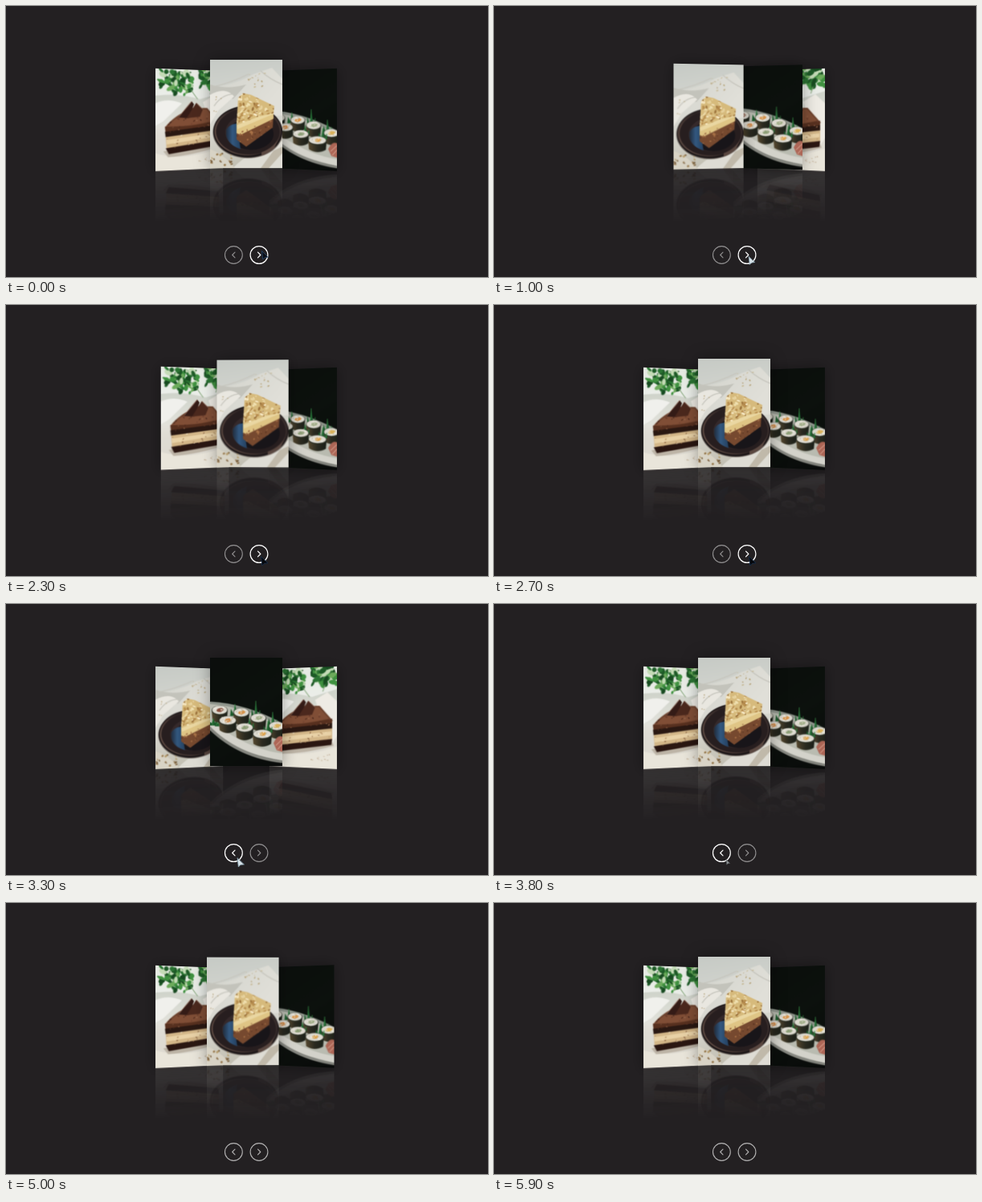
An HTML page with a canvas that plays this animation: 600 by 338 pixels, repeating every 6000 ms.

```html
<!DOCTYPE html>
<html lang="en">
<head>
<meta charset="utf-8">
<title>Dessert carousel</title>
<style>
  html, body { margin: 0; width: 100%; height: 100%; overflow: hidden; background: #232022; }
  #stage { position: absolute; left: 0; top: 0; width: 600px; height: 338px; overflow: hidden; background: #232022; }
  #deck { position: absolute; inset: 0; perspective: 375px; perspective-origin: 299.2px 135px; }
  #ring { position: absolute; inset: 0; transform-style: preserve-3d; }
  .card { position: absolute; left: 254px; top: 66.7px; width: 90.4px; height: 135.6px; box-shadow: 0 0 18px rgba(0, 0, 0, .36); }
  .card canvas { position: absolute; left: 0; top: 0; width: 90.4px; height: 203.4px; }
  svg { position: absolute; left: 0; top: 0; }
</style>
</head>
<body>
<div id="stage">
  <div id="deck"><div id="ring"></div></div>
  <svg width="600" height="338" fill="none" stroke="#fff" stroke-linecap="round" stroke-linejoin="round">
    <g id="prev"><circle cx="283.4" cy="310.5" r="10.9"/><path d="M285 307.2l-3.3 3.3 3.3 3.3"/></g>
    <g id="next"><circle cx="315" cy="310.5" r="10.9"/><path d="M313.5 307.2l3.3 3.3-3.3 3.3"/></g>
    <path id="cursor" d="M0 0L1.2 10 3.6 7.6 7.4 7.2Z" stroke-width=".7"/>
  </svg>
</div>
<script>
const W = 90, H = 136, SCALE = 2, LOOP = 6000, STEP = 100, SPEED = 300;
const $ = id => document.getElementById(id);

function random(seed) {
  return () => (seed = (seed * 16807) % 2147483647) / 2147483647;
}

function painter(c) {
  const fill = color => { c.fillStyle = color; c.fill(); };
  const p = {
    poly(color, ...v) {
      c.beginPath();
      for (let i = 0; i < v.length; i += 2) c.lineTo(v[i], v[i + 1]);
      fill(color);
    },
    path(color, d) { c.fillStyle = color; c.fill(new Path2D(d)); },
    line(color, width, d) {
      c.strokeStyle = color; c.lineWidth = width; c.stroke(new Path2D(d));
    },
    oval(color, x, y, rx, ry, turn = 0) {
      c.beginPath(); c.ellipse(x, y, rx, ry, turn, 0, 7); fill(color);
    },
    fade(x0, y0, x1, y1, ...colors) {
      const g = c.createLinearGradient(x0, y0, x1, y1);
      colors.forEach((s, i) => g.addColorStop(i / (colors.length - 1), s));
      return g;
    },
    // Scatter small spots, optionally clipped to a shape
    spots(seed, count, [x, y, w, h], size, colors, clip) {
      const r = random(seed);
      c.save();
      if (clip) c.clip(new Path2D(clip));
      for (let i = 0; i < count; i++)
        p.oval(colors[i % colors.length], x + r() * w, y + r() * h,
          size * (.5 + r()), size * (.35 + r() * .6), r() * 3);
      c.restore();
    }
  };
  return p;
}

function cake(p) {
  p.poly(p.fade(0, 0, 0, H, '#e6ebe3', '#eceeea', '#dfdcd4', '#dcd8ce'), 0, 0, W, 0, W, H, 0, H);
  p.path(p.fade(0, 34, 0, 76, '#cfd3ca', '#e2e2db'), 'M0 36Q30 32 58 40L90 30V60L0 78Z');
  p.path('#f0f0ec', 'M0 46Q16 38 34 46L10 70 0 76Z');
  const leaves = ['#1d5a26', '#3f9140', '#2b7433', '#6dab5c', '#c4dbb6', '#174a20'];
  p.spots(7, 62, [7, 2, 40, 24], 4, leaves);
  p.spots(21, 16, [24, 18, 22, 16], 3, leaves);
  p.spots(33, 55, [58, -2, 33, 26], 4, leaves);
  p.line('#7fa274', 1, 'M46 27Q51 35 55 40M75 24L72 33');
  p.path('#eeebe4', 'M62 44L78 34 90 46V92L83 104Z');
  p.path('#e9e5da', 'M0 112Q36 126 90 106V136H0Z');
  p.path('#bdb4a6', 'M10 110L16 118Q48 117 86 105L83 98Z');

  p.path('#6b402b', 'M12 78Q24 62 48 52L68 52 85 72 13 88Z');
  p.path('#804e36', 'M15 77Q28 62 50 54L67 54 80 69 22 81Z');
  p.path('#57301f', 'M12 77Q48 78 84 69V78L13 86Z');
  p.path('#2a1812', 'M12 84L84 75V84L13 92Z');
  p.path('#d3b688', 'M13 91L84 82V98L14 107Z');
  p.path('#e8d1a6', 'M14 95L83 86V91L14 101Z');
  p.path('#2a1611', 'M13 106L84 96 83 104 17 114Z');
  p.spots(43, 65, [12, 52, 72, 34], 1.1, ['#95654a', '#64392a', '#4a281c'], 'M12 78Q24 62 48 52L68 52 85 72 84 78 13 86Z');
  p.spots(47, 36, [13, 84, 70, 24], .9, ['#a87f54', '#f2e2c0', '#7d5436'], 'M13 91L84 82V98L14 107Z');
  p.path('#341b16', 'M29 65L47 43 50 47 43 66Z');
  p.path('#4b281d', 'M40 66L53 45 62 54 58 64Z');
  p.line('#8b6454', .8, 'M30 64L47 43M53 45L62 54');
  p.spots(52, 12, [57, 117, 25, 9], .8, ['#a98a6c', '#c2ab8c']);
}

function pie(p) {
  p.poly(p.fade(0, 0, 20, H, '#c6cac5', '#d2d4ce', '#d6d5cd', '#c2bfb2'), 0, 0, W, 0, W, H, 0, H);
  p.path(p.fade(0, 20, 60, 70, '#d3d4cd', '#e0dfd8'), 'M0 35Q30 32 54 18L77 10 90 24V70L0 76Z');
  p.path('#c3c3bb', 'M0 31Q22 38 45 31L29 49 0 45Z');
  p.path('#e9e7e0', 'M0 44Q19 33 30 46L10 64 0 81Z');
  p.line('#c6c5bd', 1.2, 'M4 34Q26 29 48 18M63 14Q75 25 90 31M5 58Q15 43 30 43');
  p.path('#dedcd4', 'M28 136Q54 110 90 102V136Z');
  p.path('#c0b9aa', 'M63 136L79 114 90 109V117L73 136Z');
  p.path('#d8d3c5', 'M0 112Q17 118 31 136H0Z');

  p.oval('#787069', 47, 91, 43.5, 32.5);
  p.oval('#1d1718', 47, 90, 43, 32.5);
  p.oval(p.fade(10, 115, 80, 65, '#6a544a', '#2d2323', '#3c302e'), 47, 89.5, 41.5, 30.5);
  p.oval('#271e1f', 47, 90, 39.5, 28.5);
  p.oval('#35292a', 48, 91, 29, 22);
  p.oval('#181519', 51, 93, 28, 20);
  p.path(p.fade(18, 0, 38, 0, '#1c222e', '#33587f', '#24405f'), 'M20 88Q24 81 33 80L38 112Q23 107 20 95Z');
  p.path('#5a4740', 'M64 116Q80 110 86 97L80 111Q70 119 64 120Z');

  const top = 'M35 48L41 42 51 44 80 58 79 67 61 71 33 82 34 64Z';
  const crust = 'M33 92L79 74 78 85 45 109 33 100Z';
  p.path('#76492f', 'M33 90L79 70 78 85 45 109 33 100Z');
  p.path('#dfc585', 'M33 76L79 60V74L38 94 33 92Z');
  p.path('#ead7a2', 'M33 79L79 63V68L34 87Z');
  p.path('#d6ba7c', top);
  p.spots(61, 130, [32, 40, 49, 41], 1.8, ['#f0e0b0', '#b98f50', '#e6d09c', '#f9ecca', '#9a7039'], top);
  p.spots(67, 65, [33, 72, 46, 37], 1.3, ['#8b5a3c', '#ab7448', '#5a3422', '#9c6742'], crust);
  p.spots(73, 18, [1, 117, 26, 15], 1.4, ['#987a50', '#b59b6c', '#7a6040']);
  p.spots(87, 13, [48, 17, 24, 18], 1, ['#b5a278', '#c4b48c']);
  p.spots(89, 5, [5, 43, 18, 30], .9, ['#b5a27a']);
}

function sushi(p) {
  p.poly(p.fade(0, 0, W, H, '#0b0e0c', '#0c110d', '#090b0a'), 0, 0, W, 0, W, H, 0, H);
  p.path('#8f958c', 'M0 55Q44 57 90 82V127Q40 122 0 83Z');
  p.path('#b9bbb0', 'M0 58Q43 61 90 87V121Q39 117 0 79Z');
  p.path('#d3d2ca', 'M0 79Q28 100 55 111 73 118 90 120V129Q47 122 22 105 8 96 0 86Z');
  p.path('#85867f', 'M0 86Q34 121 90 129V132Q36 126 0 91Z');
  const blade = (x, y, h) => {
    p.poly('#1b5a2b', x - 6, y, x - 5, y - h * .6, x - 2, y - 3, x, y - h, x + 3, y - 2, x + 5, y - h * .5, x + 6, y);
    p.line('#3a9149', .7, `M${x - 1} ${y}L${x} ${y - h}M${x + 4} ${y}L${x + 5} ${y - h * .5}`);
  };
  blade(31, 73, 15); blade(57, 78, 24); blade(78, 87, 19); blade(12, 86, 15);
  const roll = (x, y, heart, r = 10) => {
    const side = p.fade(x - r, 0, x + r, 0, '#57492f', '#2b2a20', '#1a1f18');
    p.path(side, `M${x - r} ${y}L${x - r + 1} ${y + 12}Q${x} ${y + 19} ${x + r - 1} ${y + 12}L${x + r} ${y}Z`);
    p.oval('#2c3026', x, y, r, 6);
    p.oval('#dddad0', x, y - .5, r - .8, 5.2);
    p.oval(heart, x + .5, y - .5, 4.5, 2.4, -.2);
    p.spots(x * 13 + y, 18, [x - 7, y - 4, 14, 7], .8, ['#f3f0e6', '#bfbba8']);
  };
  roll(12, 66, '#8a4e3c'); roll(39, 69, '#d6934a'); roll(60, 76, '#9aaa80'); roll(83, 86, '#d9b058');
  blade(49, 88, 12); blade(72, 94, 15);
  roll(22, 79, '#d4863f', 11); roll(43, 88, '#8a9d74', 11); roll(65, 96, '#dfa24a', 12);
  p.path('#ad6656', 'M79 107Q84 96 90 99V118L83 116Z');
  p.line('#d09a88', 1, 'M82 110L90 102M84 115L90 108');
  blade(4, 85, 9);
}

function makeCard(draw) {
  const art = document.createElement('canvas');
  art.width = W * SCALE;
  art.height = H * SCALE;
  const a = art.getContext('2d');
  a.scale(SCALE, SCALE);
  draw(painter(a));
  // Soften like a photo; the sharp copy beneath keeps the borders opaque
  a.filter = 'blur(1.1px)';
  a.drawImage(art, 0, 0, W, H);

  // Art on top, faded mirror image below
  const face = document.createElement('canvas');
  face.width = art.width;
  face.height = art.height * 1.5;
  const c = face.getContext('2d');
  c.scale(SCALE, SCALE);
  c.save();
  c.translate(0, 2 * H);
  c.scale(1, -1);
  c.drawImage(art, 0, 0, W, H);
  c.restore();
  c.globalCompositeOperation = 'destination-in';
  const mask = c.createLinearGradient(0, H, 0, H * 1.5);
  mask.addColorStop(0, 'rgba(0,0,0,.1)');
  mask.addColorStop(1, 'rgba(0,0,0,0)');
  c.fillStyle = mask;
  c.fillRect(0, 0, W, H * 1.5);
  c.globalCompositeOperation = 'source-over';
  c.clearRect(0, 0, W, H);
  c.drawImage(art, 0, 0, W, H);

  const card = document.createElement('div');
  card.className = 'card';
  card.append(face);
  $('ring').append(card);
  return card;
}

const cards = [cake, pie, sushi].map(makeCard);

// [click time, direction]
const clicks = [
  [922, 1], [1522, 1], [2116, 1], [2720, 1],
  [3490, -1], [3941, -1], [4365, -1], [4787, -1]
];

// [time, x, y, colour, outline, size]
const pointer = [
  [0, 318.5, 306, '#0a0d14', '#28507a', 1],
  [800, 316.5, 311, '#d8e3e9', '#819cab', 1],
  [1200, 317.5, 314, '#05070b', '#16304e', 1.1],
  [2800, 317.5, 314, '#05070b', '#16304e', 1.1],
  [3100, 287.5, 316, '#d8e3e9', '#819cab', 1.1],
  [3700, 289, 319, '#8d9295', '#45484b', .65],
  [4800, 288, 317, '#8d9295', '#45484b', .65],
  [4900, 153, 300, '#d8e3e9', '#819cab', 1]
];

// cubic-bezier(.25, .1, .25, 1)
function ease(x) {
  if (x >= 1) return 1;
  let lo = 0, hi = 1, u;
  for (let i = 0; i < 24; i++) {
    u = (lo + hi) / 2;
    if (.75 * u * (1 - u) + u ** 3 < x) lo = u; else hi = u;
  }
  return .3 * u * (1 - u) ** 2 + 3 * u * u * (1 - u) + u ** 3;
}

function placeCards(t) {
  let turn = 0, shift = 0;
  for (const [at, dir] of clicks) {
    if (t < at) break;
    turn += dir;
    shift = dir * (1 - ease((t - at) / SPEED));
  }
  cards.forEach((card, i) => {
    const rest = (i - turn + 12) % 3 - 1;
    const slot = Math.max(-1, Math.min(1, rest + shift));
    const far = Math.abs(slot);
    card.style.transform =
      `translate3d(${75.6 * slot}px, ${7.7 * far}px, ${-32 * far}px) rotateY(${-15 * slot}deg)`;
  });
}

function placePointer(t) {
  const i = pointer.findLastIndex(k => k[0] <= t);
  const [at, x, y, color, edge, size] = pointer[i];
  const [end, x1, y1] = pointer[i + 1] || [LOOP, x, y];
  const f = (t - at) / (end - at);
  const el = $('cursor');
  el.setAttribute('transform', `translate(${x + (x1 - x) * f} ${y + (y1 - y) * f}) scale(${size})`);
  el.setAttribute('fill', color);
  el.setAttribute('stroke', edge);
  el.style.display = t < 5000 ? '' : 'none';
}

function paintButtons(t) {
  const active = t < 2900 ? 'next' : t >= 3100 && t < 4900 ? 'prev' : '';
  for (const id of ['prev', 'next']) {
    const on = id === active;
    $(id).setAttribute('stroke-width', on ? 1.2 : 1.1);
    $(id).setAttribute('opacity', on ? 1 : active ? .5 : .65);
  }
}

const start = performance.now();
function tick() {
  const t = Math.floor((performance.now() - start) % LOOP / STEP) * STEP;
  placeCards(t);
  placePointer(t);
  paintButtons(t);
  requestAnimationFrame(tick);
}
tick();
</script>
</body>
</html>
```
